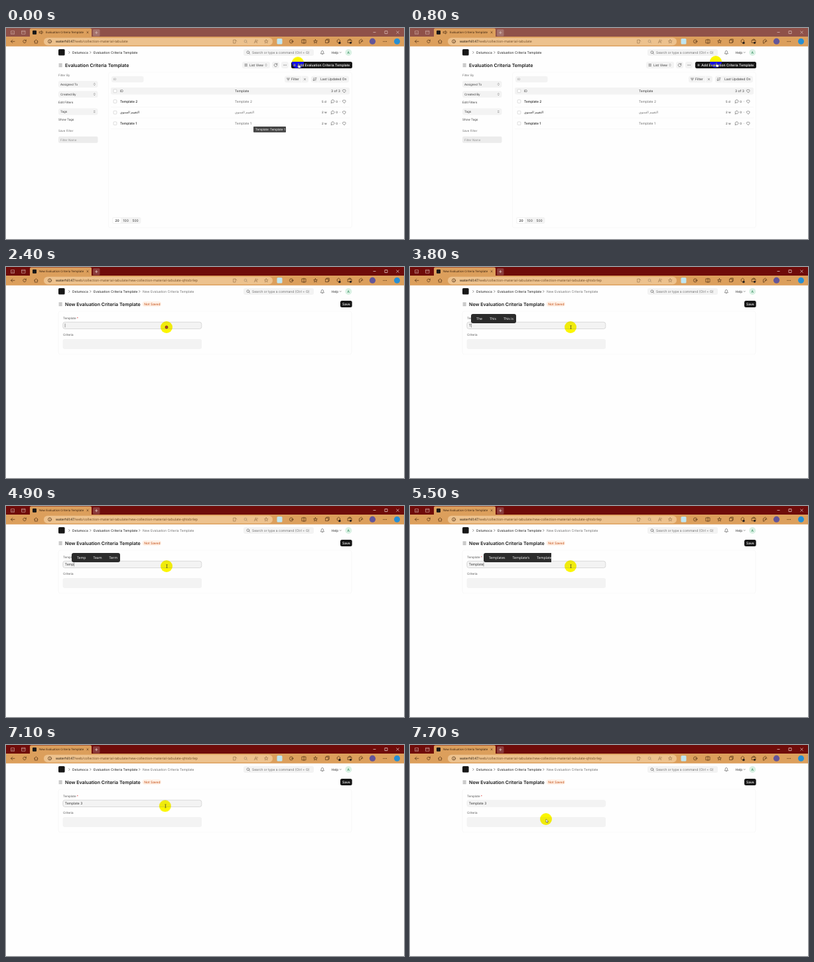
These frames come from a looping animation (600 by 319 pixels, 8 s). An HTML page:

```html
<!DOCTYPE html>
<html lang="en">
<head>
<meta charset="utf-8">
<title>Template form</title>
<style>
  html, body { margin: 0; width: 600px; height: 319px; overflow: hidden; background: #fefefe; }
  svg, #popup { position: absolute; }
  svg { left: 0; top: 0; display: block; }
  text { font: 400 4.97px Inter, sans-serif; fill: #383838; text-rendering: geometricPrecision; }
  .mid { font-weight: 500; }
  .name { font-weight: 500; fill: #222; }
  .title { font-size: 7.1px; font-weight: 600; fill: #171717; }
  .small { font-size: 4.5px; }
  .grey { fill: #707070; }
  .hint { fill: #929292; }
  .white { fill: #fff; }
  .arabic { font-family: "DejaVu Sans", sans-serif; font-weight: 400; font-size: 4.8px; }
  .tab { font: 400 4.35px "Open Sans", sans-serif; fill: #2a1608; }
  .url { font: 400 5.2px "Open Sans", sans-serif; fill: #704a24; }
  .url tspan { fill: #1d1207; }
  .line { fill: none; stroke: #444; stroke-width: .55; stroke-linecap: round; stroke-linejoin: round; }
  .soft { fill: #f3f3f3; }
  .edge { fill: none; stroke: #f3f3f3; stroke-width: .6; }
  .tool { fill: none; stroke: #4a2b10; stroke-width: .65; stroke-linecap: round; stroke-linejoin: round; }
  .dim { opacity: .5; }

  .before { animation: leave 8s step-end infinite; }
  .after { animation: enter 8s step-end infinite; }
  .interim { animation: interim 8s step-end infinite; }
  .renamed { animation: rename 8s step-end infinite; }
  .tip { animation: tip 8s step-end infinite; }
  #strip { animation: strip 8s step-end infinite; }
  #controls { animation: controls 8s step-end infinite; }
  #field { animation: blur 8s step-end infinite; }
  .follow { animation: travel 8s linear infinite; }
  #halo { fill: #0308ff; mix-blend-mode: difference; }

  @keyframes leave { 0% { visibility: visible } 13.75%, 100% { visibility: hidden } }
  @keyframes enter { 0% { visibility: hidden } 13.75%, 100% { visibility: visible } }
  @keyframes interim { 0% { visibility: hidden } 13.75% { visibility: visible } 18.75%, 100% { visibility: hidden } }
  @keyframes rename { 0% { visibility: hidden } 18.75%, 100% { visibility: visible } }
  @keyframes tip { 0% { visibility: visible } 2.5%, 100% { visibility: hidden } }
  @keyframes strip { 0% { fill: #8f5149 } 12.5%, 100% { fill: #6f0c0a } }
  @keyframes controls { 0% { stroke: #e0c4bd } 12.5%, 100% { stroke: #f3dcd6 } }
  @keyframes blur { 0% { stroke: #cdcdcd } 91.25%, 100% { stroke: #f3f3f3 } }
  @keyframes travel {
    0%, 1.25% { transform: translate(440px, 52.5px) }
    5% { transform: translate(462px, 43px) }
    7.5% { transform: translate(466px, 45px) }
    11.25% { transform: translate(458.5px, 54px) }
    17.5% { transform: translate(458.5px, 54px); animation-timing-function: ease-in-out }
    22.5% { transform: translate(241.5px, 96px) }
    23.75%, 27.5% { transform: translate(241.5px, 94px) }
    28.75% { transform: translate(247px, 92px) }
    30% { transform: translate(242px, 91px) }
    87.5% { transform: translate(242px, 91px); animation-timing-function: ease-in-out }
    95% { transform: translate(205px, 113px) }
    96.25%, 100% { transform: translate(205px, 112px) }
  }

  #popup {
    top: 70.5px; height: 14px; padding: 0 4.5px 0 8px; box-sizing: border-box;
    display: flex; align-items: center; gap: 11px; white-space: nowrap;
    background: #2b2b2b; color: #fff; border-radius: 3px;
    font: 400 5.2px "Open Sans", sans-serif; text-rendering: geometricPrecision;
  }
</style>
</head>
<body>
<svg width="600" height="319" viewBox="0 0 600 319">
  <defs>
    <path id="next" class="line" d="M-.8-1.5 .7 0-.8 1.5"/>
    <path id="down" class="line" d="M-1-.5 0 .5 1-.5"/>
    <path id="sort" class="line" d="M-.8-.8 0-1.6 .8-.8M-.8 .8 0 1.6 .8 .8"/>
    <rect id="check" x="-2.4" y="-2.4" width="4.8" height="4.8" rx="1" fill="#fff" stroke="#bbb" stroke-width=".5"/>
    <path id="heart" class="line" d="M0 2.4-2.3 0A1.5 1.5 0 0 1 0-1.7 1.5 1.5 0 0 1 2.3 0Z"/>
    <path id="note" class="line" d="M-2.3 2.2-2 .9A2.4 2.2 0 1 1-.7 1.9Z"/>
    <path id="star" class="tool" d="M0-2.8 .8-.9 2.8-.8 1.3 .5 1.8 2.5 0 1.4-1.8 2.5-1.3 .5-2.8-.8-.8-.9Z"/>
    <path id="lens" class="line" d="M1.2 1.2 2.4 2.4M1.6-.3A1.9 1.9 0 1 1-2.2-.3 1.9 1.9 0 0 1 1.6-.3"/>
    <path id="spin" d="M2.1-1.1A2.3 2.3 0 1 0 2.3.5M2.3-2.5V-1H.8"/>
    <g id="meta">
      <use href="#note" x="492.5"/><text class="small" x="497.2" y="1.7">0</text>
      <circle cx="503.5" r=".4" fill="#777"/><use href="#heart" x="509.7"/>
    </g>
  </defs>
  <rect width="600" height="319" fill="#fefefe"/>

  <!-- Browser frame -->
  <rect id="strip" width="600" height="13"/>
  <path d="M36 13V2.500Q36 .5 38 .5H127Q129 .5 129 2.500V13Z" fill="#dc9f5c"/>
  <rect x="131" y="2" width="10.500" height="10.500" rx="1.500" fill="#fff" opacity=".2"/>
  <rect y="13" width="600" height="14.800" fill="#dc9f5c"/>
  <rect x="57" y="14.700" width="345" height="11.500" rx="5.700" fill="#edc28e"/>
  <g id="controls" fill="none" stroke-width=".7">
    <path d="M553.5 6.500H557.500M571 4.500H575V8.500H571ZM588.5 4.500 592.5 8.500M592.5 4.500 588.5 8.500M134.200 7H138.400M136.300 4.900V9.100"/>
    <path opacity=".7" d="M7.500 9.300V4.500H12.500V9.300ZM8.500 7.500H11.500M23.500 4.200H29V9.200H23.500ZM23.500 5.800H29"/>
  </g>
  <rect x="40" y="3.700" width="6" height="6" rx="1" fill="#171717"/>
  <path class="tool" d="M121.900 5.500 124.100 7.700M124.100 5.500 121.900 7.700"/>
  <g class="before">
    <path class="tool" d="M50.500 5.600H52L53.700 4.200V9L52 7.600H50.500ZM55 5.200Q56.200 6.600 55 8"/>
    <text class="tab" x="60" y="8.300">Evaluation Criteria Template</text>
    <text class="url" x="75" y="22.400"><tspan>waterhill:47</tspan>/web/collection-material-tabulate</text>
  </g>
  <text class="tab interim" x="50" y="8.300">Evaluation Criteria Template</text>
  <text class="tab renamed" x="50" y="8.300">New Evaluation Criteria Template</text>
  <text class="url after" x="75" y="22.400"><tspan>waterhill:47</tspan>/web/collection-material-tabulate/new-collection-material-tabulate-qhtxbrlep</text>
  <path class="tool" d="M13 20.300H7.500M9.800 18 7.500 20.300 9.800 22.600M42.500 20.300 45.300 17.700 48.100 20.300M43.300 19.700V23H47.300V19.700"/>
  <use href="#spin" class="tool" x="28" y="20.300"/>
  <g class="tool">
    <circle cx="66" cy="20.300" r="2.600"/><path d="M66 20.200V21.600M66 18.800V18.900"/>
  </g>
  <g class="dim">
    <path class="tool" d="M343 18H346V23H343ZM346 18 348 20"/>
    <use href="#lens" x="361.300" y="20.300"/>
    <path class="tool" d="M374.500 22.700 376.500 17.700 378.500 22.700M375.300 21H377.700M379 18Q380 19 379 20"/>
    <use href="#star" x="392.300" y="20.300"/>
  </g>
  <rect x="408.500" y="16" width="8" height="8.500" rx="1.500" fill="#bfe6f2"/>
  <g class="tool">
    <circle cx="430" cy="20.300" r="2.600"/><path d="M430 20.300H433"/>
    <path d="M446.300 17.800H452V22.800H446.300ZM449.100 17V23.600"/>
    <path d="M482 18H486V22.500H482ZM483.200 18V16.900H487.200V21.300H486"/>
    <path d="M499.500 18.500 501.500 17 503.500 18.500V21.500L501.500 23 499.500 21.500Z"/>
    <path d="M515.500 18.300H521V22.300H515.500ZM517 18.300V17H519.500V18.300"/>
    <path d="M532.500 22.800V19L535.500 17 537.500 18.500 534.500 22.500ZM535 20H538"/>
  </g>
  <use href="#star" x="466.500" y="20.300"/>
  <circle cx="503" cy="22.500" r="1.700" fill="#27221f"/>
  <circle cx="519.500" cy="22.300" r="1.600" fill="#27221f"/>
  <circle cx="552.500" cy="20.200" r="4.600" fill="#62559a"/>
  <g fill="#4a2b10"><circle cx="569" cy="20.300" r=".6"/><circle cx="571.200" cy="20.300" r=".6"/><circle cx="573.400" cy="20.300" r=".6"/></g>
  <circle cx="589.500" cy="20.300" r="4.500" fill="#268fd4"/>

  <!-- App bar -->
  <rect x="79" y="32" width="9.600" height="9.600" rx="1.500" fill="#171717"/>
  <use href="#next" x="95.500" y="37"/>
  <text class="mid" x="100" y="38.800">Delumoca</text>
  <use href="#next" x="127.500" y="37"/>
  <text class="mid" x="132" y="38.800">Evaluation Criteria Template</text>
  <g class="after">
    <use href="#next" x="201.500" y="37"/>
    <text class="grey" x="206" y="38.800">New Evaluation Criteria Template</text>
  </g>
  <rect class="soft" x="358" y="32" width="106" height="10" rx="3"/>
  <use href="#lens" x="365.200" y="37"/>
  <text class="grey" x="371" y="38.800">Search or type a command (Ctrl + G)</text>
  <path class="line" d="M474.500 38.500Q475.300 37.600 475.300 36A1.600 1.600 0 0 1 478.500 36Q478.500 37.600 479.300 38.500ZM476.300 39.600H477.500"/>
  <text x="490.500" y="38.800">Help</text>
  <use href="#down" x="504.200" y="37"/>
  <circle cx="516.300" cy="37" r="5" fill="#daf1e4"/>
  <text class="mid" x="516.300" y="38.900" text-anchor="middle" style="fill:#2f8a5b">A</text>
  <path class="line" d="M80 54.300H84.300M80 56.300H84.300M80 58.300H84.300"/>

  <!-- List page -->
  <g class="before">
    <text class="title" x="89" y="58.600">Evaluation Criteria Template</text>
    <g class="soft">
      <rect x="356" y="51" width="42" height="10" rx="3"/>
      <rect x="401" y="51" width="11" height="10" rx="3"/>
      <rect x="415" y="51" width="11" height="10" rx="3"/>
      <rect x="79" y="80" width="59.500" height="10" rx="3"/>
      <rect x="79" y="95.200" width="59.500" height="10" rx="3"/>
      <rect x="79" y="121.500" width="59.500" height="10" rx="3"/>
      <rect x="79" y="164" width="59.500" height="9.800" rx="2" fill="#ececec"/>
      <rect x="159" y="72.700" width="48.500" height="9.600" rx="3"/>
      <rect x="420" y="72.500" width="36" height="10" rx="3"/>
      <rect x="460" y="72.500" width="57" height="10" rx="3"/>
      <rect x="158" y="90" width="360" height="10.500" rx="2.500"/>
      <rect x="160" y="286" width="43.500" height="10" rx="3"/>
    </g>
    <path class="line" d="M360 54.500H363.500M360 56H363.500M360 57.500H363.500"/>
    <text x="367" y="57.800">List View</text>
    <use href="#sort" x="392" y="56"/>
    <use href="#spin" class="line" x="406.500" y="56.100"/>
    <g fill="#444"><circle cx="418.800" cy="56" r=".5"/><circle cx="420.600" cy="56" r=".5"/><circle cx="422.400" cy="56" r=".5"/></g>
    <rect x="430" y="51" width="92" height="10" rx="2.500" fill="#171717"/>
    <path d="M433.200 56.100H436.800M435 54.300V57.900" stroke="#fff" stroke-width=".6"/>
    <text class="mid white" x="439.300" y="57.800" style="font-size:5.070px">Add Evaluation Criteria Template</text>

    <text class="small grey" x="79" y="73.200">Filter By</text>
    <text class="small" x="82" y="86.700">Assigned To</text><use href="#sort" x="133.300" y="85"/>
    <text class="small" x="82" y="101.900">Created By</text><use href="#sort" x="133.300" y="100.200"/>
    <text class="small" x="79" y="114.100">Edit Filters</text>
    <text class="small" x="82" y="128.200">Tags</text><use href="#sort" x="133.300" y="126.500"/>
    <text class="small" x="79" y="139.600">Show Tags</text>
    <text class="small grey" x="79" y="157.100">Save Filter</text>
    <text class="small hint" x="82" y="170.600">Filter Name</text>

    <rect class="edge" x="154.500" y="67" width="367" height="235" rx="3"/>
    <text class="small hint" x="162" y="79.200">ID</text>
    <path class="line" d="M423.300 76H427.700M424.200 77.500H426.800M425 79H426"/>
    <text x="430" y="79.300">Filter</text>
    <path class="line" d="M449.400 76.400 451.600 78.600M451.600 76.400 449.400 78.600"/>
    <path d="M445.500 72.500V82.500M470.500 72.500V82.500" stroke="#fff" stroke-width=".6"/>
    <path class="line" d="M464 75.500V79.500M463 78.500 464 79.600 465 78.500M466 75.500H468M466 77.300H467.600M466 79H467"/>
    <text x="474" y="79.300">Last Updated On</text>

    <use href="#check" x="164.500" y="95.200"/>
    <text x="172" y="97">ID</text><text x="345" y="97">Template</text>
    <text x="490" y="97">3 of 3</text><use href="#heart" x="509.700" y="95.200"/>
    <path d="M158 119.500H518M158 136H518M158 152.500H518" stroke="#f0f0f0" stroke-width=".5"/>
    <use href="#check" x="164.500" y="111"/><use href="#check" x="164.500" y="127.700"/><use href="#check" x="164.500" y="144.200"/>
    <text class="name" x="172" y="112.800">Template 2</text>
    <text class="name arabic" x="172" y="129.300">التقييم السنوي</text>
    <text class="name" x="172" y="146">Template 1</text>
    <text class="grey" x="345" y="112.800">Template 2</text>
    <text class="grey arabic" x="345" y="129.300">التقييم السنوي</text>
    <text class="grey" x="345" y="146">Template 1</text>
    <text class="small" x="476" y="112.700">5 d</text>
    <text class="small" x="476" y="129.400">2 w</text>
    <text class="small" x="476" y="145.900">2 w</text>
    <use href="#meta" y="111"/><use href="#meta" y="127.700"/><use href="#meta" y="144.200"/>
    <rect x="161" y="287" width="12.500" height="8" rx="2.300" fill="#fff"/>
    <text class="name" x="164.500" y="292.900">20</text>
    <text x="176.500" y="292.900">100</text><text x="190.500" y="292.900">500</text>
  </g>
  <g class="tip">
    <rect x="373" y="149" width="49" height="8.800" rx=".8" fill="#444"/>
    <text class="small white" x="376" y="155">Template: Template 1</text>
  </g>

  <!-- Form page -->
  <g class="after">
    <text class="title" x="89" y="58.600">New Evaluation Criteria Template</text>
    <rect x="205.500" y="52" width="28.500" height="8" rx="4" fill="#fff1e7"/>
    <text class="mid" x="208.200" y="57.800" style="fill:#c95f2a">Not Saved</text>
    <rect x="504" y="51" width="17.700" height="10" rx="2.500" fill="#171717"/>
    <text class="mid white" x="512.800" y="57.800" text-anchor="middle">Save</text>
    <rect class="edge" x="79" y="67" width="442" height="65" rx="3"/>
    <text class="small" x="86" y="79.100" style="fill:#555">Template <tspan fill="#e03636">*</tspan></text>
    <rect id="field" class="soft" x="85.800" y="83.300" width="209" height="10.200" rx="3" stroke-width=".7"/>
    <text id="typed" x="88.800" y="90.200" style="font-size:5.050px"></text>
    <rect id="caret" y="85.500" width=".5" height="5.800" fill="#444"/>
    <text class="small" x="86" y="104.200" style="fill:#555">Criteria</text>
    <rect class="soft" x="85.500" y="109" width="209.500" height="15" rx="3"/>
  </g>

  <circle id="halo" class="follow" r="9"/>
  <g class="follow">
    <path data-pose="hand" d="M.5 1.500Q1.200 1 1.500 2V4L4 4.700Q4.600 5 4.300 6.500L3.800 8H1L-.8 5.500Q-.6 4.700 .4 5.300Z" fill="#fff" stroke="#222" stroke-width=".5"/>
    <path data-pose="arrow" d="M0 0V5L1.200 4 2 5.700 2.900 5.300 2.100 3.600H3.700Z" fill="#fff" stroke="#333" stroke-width=".45"/>
    <path data-pose="beam" d="M-.6-2.200H1.600M.5-2.200V2.200M-.6 2.200H1.600" fill="none" stroke="#4a4820" stroke-width=".7"/>
    <circle data-pose="press" r="2" fill="#b8402c" stroke="#6d2a17" stroke-width=".8"/>
  </g>
</svg>
<div id="popup"></div>

<script>
const LOOP = 8000, TEXT_X = 88.8;
const typed = document.getElementById('typed');
const caret = document.getElementById('caret');
const popup = document.getElementById('popup');
const poses = document.querySelectorAll('[data-pose]');

// Each entry holds from its time until the next one.
const keys = [
  [0, ''], [1200, ''], [2400, ''], [3400, 'T'], [4100, 'Te'], [4500, 'Tem'], [4900, 'Temp'],
  [5000, 'Templ'], [5200, 'Templa'], [5500, 'Template'], [5900, 'Template '], [6400, 'Template 3']
];
const full = 'Templates|Template\'s|Template which';
const hints = [
  [0, ''],
  [3800, 'The|This|This is', 'T'],
  [4300, 'Test|Team|Tell me', 'Te'],
  [4600, 'Temp|Team|Term', 'Tem'],
  [5000, 'Temples|Templates', 'Templ'],
  [5300, 'Template|Templates|Templar', 'Templa'],
  [5500, full, 'Template', 102],
  [5600, full, 'Template'],
  [5900, ''],
  [6200, 'for|is|and', 'Template '],
  [6700, '']
];
const pointers = [[0, 'hand'], [1100, 'arrow'], [1700, 'beam'], [2300, 'press'], [2600, 'beam'], [7200, 'arrow']];

const at = (list, t) => list.findLast(entry => entry[0] <= t);

function endOf(text) {
  typed.textContent = text.replace(/ /g, '\u00a0');
  return TEXT_X + (text ? typed.getComputedTextLength() : 0);
}

let shownHint;
function showHint(hint) {
  if (hint === shownHint) return;
  shownHint = hint;
  const [, words, text, cut] = hint;
  popup.style.display = words ? 'flex' : 'none';
  if (!words) return;
  popup.replaceChildren(...words.split('|').map(word => {
    const span = document.createElement('span');
    span.textContent = word;
    return span;
  }));
  popup.style.left = endOf(text) + 'px';
  popup.style.clipPath = cut ? `inset(0 calc(100% - ${cut}px) 0 0)` : 'none';
}

let start;
function draw(now) {
  start ??= now;
  const t = (now - start) % LOOP;
  showHint(at(hints, t));
  const [since, text] = at(keys, t);
  caret.setAttribute('x', endOf(text));
  const lit = t >= 1100 && t < 7300 && (t - since) % 1000 < 500;
  caret.style.opacity = lit ? 1 : 0;
  const pose = at(pointers, t)[1];
  for (const el of poses) el.style.display = el.dataset.pose === pose ? '' : 'none';
  requestAnimationFrame(draw);
}
requestAnimationFrame(draw);
</script>
</body>
</html>
```
